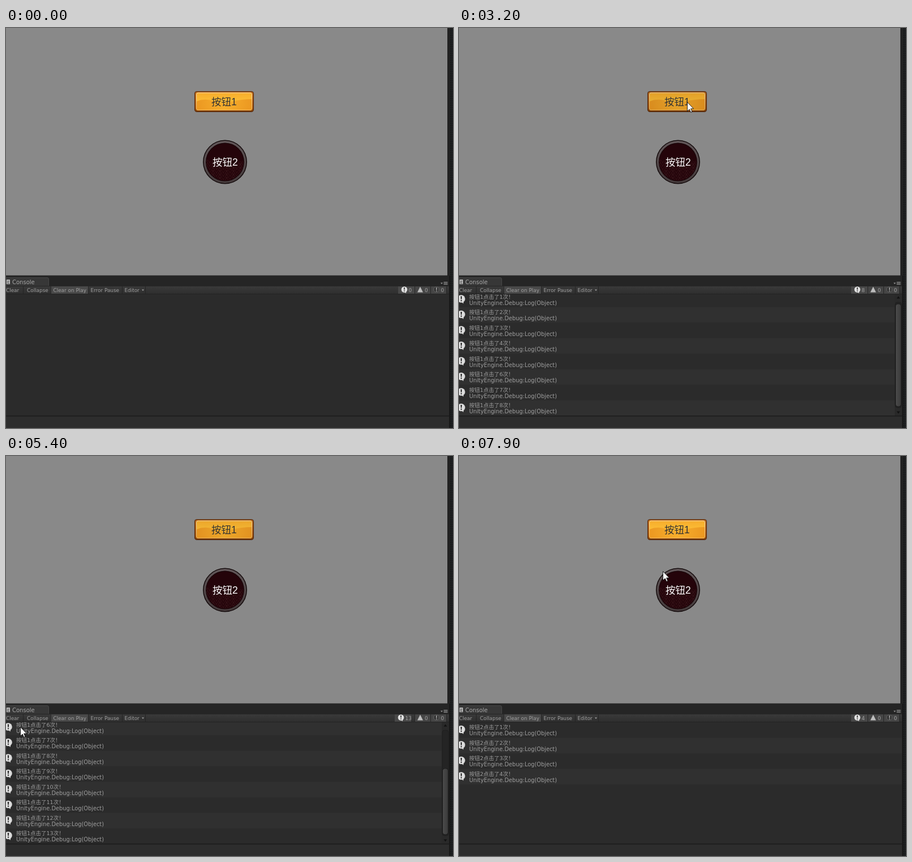
An HTML page that plays this animation: 790x709 px, repeating every 8000 ms.

```html
<!DOCTYPE html>
<html lang="zh">
<head>
<meta charset="utf-8">
<title>Button clicks</title>
<style>
html, body { margin: 0; width: 100%; height: 100%; overflow: hidden; background: #2b2b2b; }
svg { display: block; }
text { font-family: "DejaVu Sans", "Noto Sans CJK SC", "Noto Sans CJK", sans-serif; white-space: pre; }
.label { font: 17.5px "Liberation Sans", "Noto Sans CJK SC", "Noto Sans CJK", sans-serif; }
.bar { font-size: 8.9px; fill: #a2a2a2; }
.log { font-size: 9.8px; fill: #9e9e9e; }
.message { font-size: 9.5px; font-family: "DejaVu Sans", "Noto Sans CJK JP", "Noto Sans CJK SC", sans-serif; }
</style>
</head>
<body>
<svg id="stage" width="790" height="709" viewBox="0 0 790 709">
  <defs>
    <linearGradient id="bevel" x2="0" y2="1">
      <stop offset="0" stop-color="#b8691c"/><stop offset=".8" stop-color="#a4560f"/><stop offset="1" stop-color="#7c3d08"/>
    </linearGradient>
    <linearGradient id="rim" x2="0" y2="1">
      <stop offset="0" stop-color="#ffe2a8"/><stop offset="1" stop-color="#f6bd62"/>
    </linearGradient>
    <linearGradient id="gold" x2="0" y2="1">
      <stop offset="0" stop-color="#f6ad2c"/><stop offset=".45" stop-color="#fbbb35"/><stop offset="1" stop-color="#f8b52f"/>
    </linearGradient>
    <linearGradient id="amber">
      <stop offset="0" stop-color="#e8901d"/><stop offset=".5" stop-color="#f6ac2b"/><stop offset="1" stop-color="#e8901d"/>
    </linearGradient>
    <linearGradient id="ring" x2="0" y2="1">
      <stop offset="0" stop-color="#625759"/><stop offset="1" stop-color="#453b3c"/>
    </linearGradient>
    <linearGradient id="tool" x2="0" y2="1">
      <stop offset="0" stop-color="#3a3a3a"/><stop offset="1" stop-color="#2e2e2e"/>
    </linearGradient>
    <linearGradient id="thumbFill">
      <stop offset="0" stop-color="#4b4b4b"/><stop offset="1" stop-color="#3a3a3a"/>
    </linearGradient>
    <pattern id="waves" width="12" height="6" patternUnits="userSpaceOnUse">
      <path d="M0 6a6 6 0 0 1 12 0M3 6a3 3 0 0 1 6 0M-6 3a6 6 0 0 1 12 0M6 3a6 6 0 0 1 12 0" fill="none" stroke="#3a171b" stroke-width=".7"/>
    </pattern>
    <pattern id="edge" width="4" height="4" patternUnits="userSpaceOnUse">
      <path d="M0 0h4v4h-4z" fill="#1d1f20"/><path d="M0 1h3" stroke="#141516"/>
    </pattern>
    <clipPath id="disc"><circle cx="387" cy="237.5" r="33"/></clipPath>
    <g id="bubble">
      <circle r="6.800"/>
      <path d="M0 5L3.500 8.500L4.500 4Z"/>
      <path d="M-1.200-4.500h2.400l-.5 5.500h-1.400zM-1 2.200h2v2h-2z" fill="#262626"/>
    </g>
  </defs>

  <rect width="790" height="709" fill="#222"/>
  <rect width="780" height="438.500" fill="#898989"/>

  <g>
    <rect x="333" y="112" width="105" height="37" rx="4.500" fill="#4f230a"/>
    <rect x="334" y="113" width="103" height="35" rx="3.500" fill="url(#bevel)"/>
    <rect x="336.500" y="115" width="98" height="30.500" rx="2.500" fill="url(#gold)"/>
    <path d="M337 130Q350 124 366 129T400 130T434 126V145H337Z" fill="url(#amber)" opacity=".8"/>
    <rect x="336.500" y="115" width="98" height="30.500" rx="2.500" fill="none" stroke="url(#rim)"/>
    <rect id="shade1" x="333" y="112" width="105" height="37" rx="4.500"/>
    <text class="label" x="363" y="137" fill="#323232">按钮1</text>
  </g>

  <g>
    <circle cx="387" cy="237.500" r="39" fill="#130a0b"/>
    <circle cx="387" cy="237.500" r="37.500" fill="url(#ring)"/>
    <circle cx="387" cy="237.500" r="34" fill="#140205"/>
    <circle cx="387" cy="237.500" r="33" fill="#24040a"/>
    <path d="M350 234Q362 231 372 240T400 242T424 235V275H350Z" fill="url(#waves)" clip-path="url(#disc)"/>
    <circle id="shade2" cx="387" cy="237.500" r="39"/>
    <text class="label" x="365" y="244" fill="#fff">按钮2</text>
  </g>

  <rect y="439" width="783" height="18" fill="#252525"/>
  <path d="M0 457V442.500H73Q76 442.500 76 446V457Z" fill="#373737"/>
  <path d="M0 442.500H73Q75.500 442.500 75.500 446V457" fill="none" stroke="#474747"/>
  <path d="M1 446h6v8h-6z" fill="#c4c4c4"/>
  <path d="M2 448.500h4M2 450.500h3M2 452.500h4" stroke="#444"/>
  <text x="11" y="454" font-size="10" fill="#a8a8a8">Console</text>
  <path d="M768 451.500h4l-2 2.500zM773.500 450h7v1h-7zm0 2h7v1h-7zm0 2h7v1h-7z" fill="#999"/>

  <rect y="457" width="783" height="15" fill="url(#tool)"/>
  <rect id="clearDown" width="30" y="457" height="14" fill="#484848"/>
  <rect x="79" y="457" width="66" height="14" fill="#494949"/>
  <path d="M0 457.500H783M0 471.500H783M30.500 457V471M79.500 457V471M145.500 457V471M205.500 457V471M246.500 457V471" stroke="#202020" opacity=".75"/>
  <g class="bar">
    <text x="0" y="467.500">Clear</text><text x="37" y="467.500">Collapse</text>
    <text x="83.500" y="467.500">Clear on Play</text><text x="149.500" y="467.500">Error Pause</text>
    <text x="209.500" y="467.500">Editor</text>
    <path d="M240 463.500h4l-2 2.500z"/>
  </g>
  <g id="info">
    <rect x="693" y="458" width="29" height="13" fill="#484848"/>
    <use href="#bubble" transform="translate(704 463.500) scale(.78)" fill="#e0e0e0"/>
    <text id="total" class="bar" x="711.500" y="467.500"></text>
  </g>
  <rect x="722" y="458" width="56" height="13" fill="#454545"/>
  <path d="M722.500 458v13M750.500 458v13M778.500 458v13" stroke="#262626"/>
  <path d="M732 458.500L737 468.500H727Z" fill="#bdbdbd"/>
  <path d="M758.500 459h4l2.500 2.500v4l-2.500 2.500h-4l-2.500-2.500v-4z" fill="#333" stroke="#777" stroke-width=".7"/>
  <path d="M760 460h1.500v4.500h-1.500zm0 5.500h1.500v1.500h-1.500z" fill="#aaa"/>
  <g class="bar"><text x="740" y="467.500">0</text><text x="768.500" y="467.500">0</text></g>

  <rect y="472" width="783" height="215.500" fill="#2b2b2b"/>
  <svg y="472" width="783" height="215.500"><g id="rows"></g></svg>
  <g id="scrollbar">
    <rect x="770" y="472" width="13" height="215" fill="#292929"/>
    <rect x="771" y="486" width="11" height="187" rx="4" fill="#242424" stroke="#1e1e1e"/>
    <path d="M773.500 479.500h6l-3-4zM773.500 679.500h6l-3 4z" fill="#111"/>
    <rect id="thumb" x="771.500" width="10" rx="4" fill="url(#thumbFill)" stroke="#191919"/>
  </g>
  <rect y="687" width="783" height="1.500" fill="#1a1a1a"/>
  <rect y="688.500" width="783" height="20.500" fill="#2d2d2d"/>
  <rect x="783" y="439" width="2" height="270" fill="#191919"/>
  <rect x="785" width="5" height="709" fill="url(#edge)"/>

  <path id="cursor" d="M.5.5V16.500L4.200 13L6.700 18.500L9 17.500L6.600 12H11.500Z" fill="#fff" stroke="#111" stroke-width=".9"/>
</svg>
<script>
const LOOP = 8000, STEP = 100, ROW = 27.5, VIEW = 215.5;
const CLEARED = 5900;
const clicks1 = [1100, 1700, 1900, 2100, 2300, 2800, 3000, 3200, 3400, 3700, 4100, 4400, 4600];
const clicks2 = [6600, 6800, 7000, 7200];
// time, x, y of the pointer tip
const path = [
  [400, 471, 193], [600, 430, 158], [900, 385, 128], [1500, 385, 128], [1600, 386, 127],
  [2300, 391, 127], [2400, 392, 127], [2500, 402, 127], [2700, 402, 129], [3200, 403, 131],
  [3800, 409, 130], [4100, 415, 128], [4600, 421, 127], [4700, 345, 190], [4800, 224, 306],
  [4900, 150, 400], [5100, 62, 508], [5400, 25, 480], [5700, 13, 461], [6000, 13, 461],
  [6200, 160, 370], [6500, 402, 232], [7400, 402, 232], [7900, 360, 204]
];
const $ = id => document.getElementById(id);

const rowHtml = i => `<g transform="translate(0 ${i * ROW})">
  <rect width="783" height="${ROW}" fill="${i % 2 ? '#303030' : '#2b2b2b'}"/>
  <use href="#bubble" x="4" y="12.500" fill="#dcdcdc"/>
  <text class="log message" x="18" y="12.200"></text>
  <text class="log" x="18" y="23">UnityEngine.Debug:Log(Object)</text></g>`;
$('rows').innerHTML = clicks1.map((_, i) => rowHtml(i)).join('');
const rows = [...$('rows').children];

function pointer(t) {
  const i = path.findIndex(p => p[0] > t);
  if (i < 0) return path[path.length - 1].slice(1);
  const [a, b] = [path[i - 1], path[i]];
  const k = (t - a[0]) / (b[0] - a[0]);
  return [1, 2].map(n => Math.round(a[n] + (b[n] - a[n]) * k));
}

// Darkening while a press fades in and out again
function pressShade(clicks, t) {
  if (clicks.includes(t + STEP)) return .12;
  return clicks.includes(t) ? .08 : .04;
}

function draw(t) {
  const button = t < CLEARED ? 1 : 2;
  const count = (button === 1 ? clicks1 : clicks2).filter(c => c <= t).length;
  rows.forEach((row, i) => {
    row.style.display = i < count ? '' : 'none';
    row.querySelector('text').textContent = `按钮${button}点击了${i + 1}次！`;
  });
  const scroll = Math.max(0, count * ROW - VIEW);
  $('rows').setAttribute('transform', `translate(0 ${-scroll})`);
  $('scrollbar').style.display = scroll ? '' : 'none';
  if (scroll) {
    const height = 13.5 + 172 * VIEW / (count * ROW);
    $('thumb').setAttribute('y', 671 - height);
    $('thumb').setAttribute('height', height);
  }
  $('total').textContent = count;
  $('info').setAttribute('transform', `translate(${count > 9 ? -6 : 0} 0)`);
  $('clearDown').style.display = t === CLEARED - STEP ? '' : 'none';

  const active1 = t >= clicks1[0] && t < clicks2[0];
  $('shade1').setAttribute('opacity', active1 ? pressShade(clicks1.slice(1), t) : t === clicks2[0] ? .02 : 0);
  $('shade2').setAttribute('opacity', t >= 6500 && t <= 7200 ? pressShade(clicks2, t) : 0);

  $('cursor').style.display = t < path[0][0] ? 'none' : '';
  if (t >= path[0][0]) $('cursor').setAttribute('transform', `translate(${pointer(t)})`);
}

function tick() {
  draw(Math.floor(performance.now() % LOOP / STEP) * STEP);
  requestAnimationFrame(tick);
}
tick();
</script>
</body>
</html>
```
